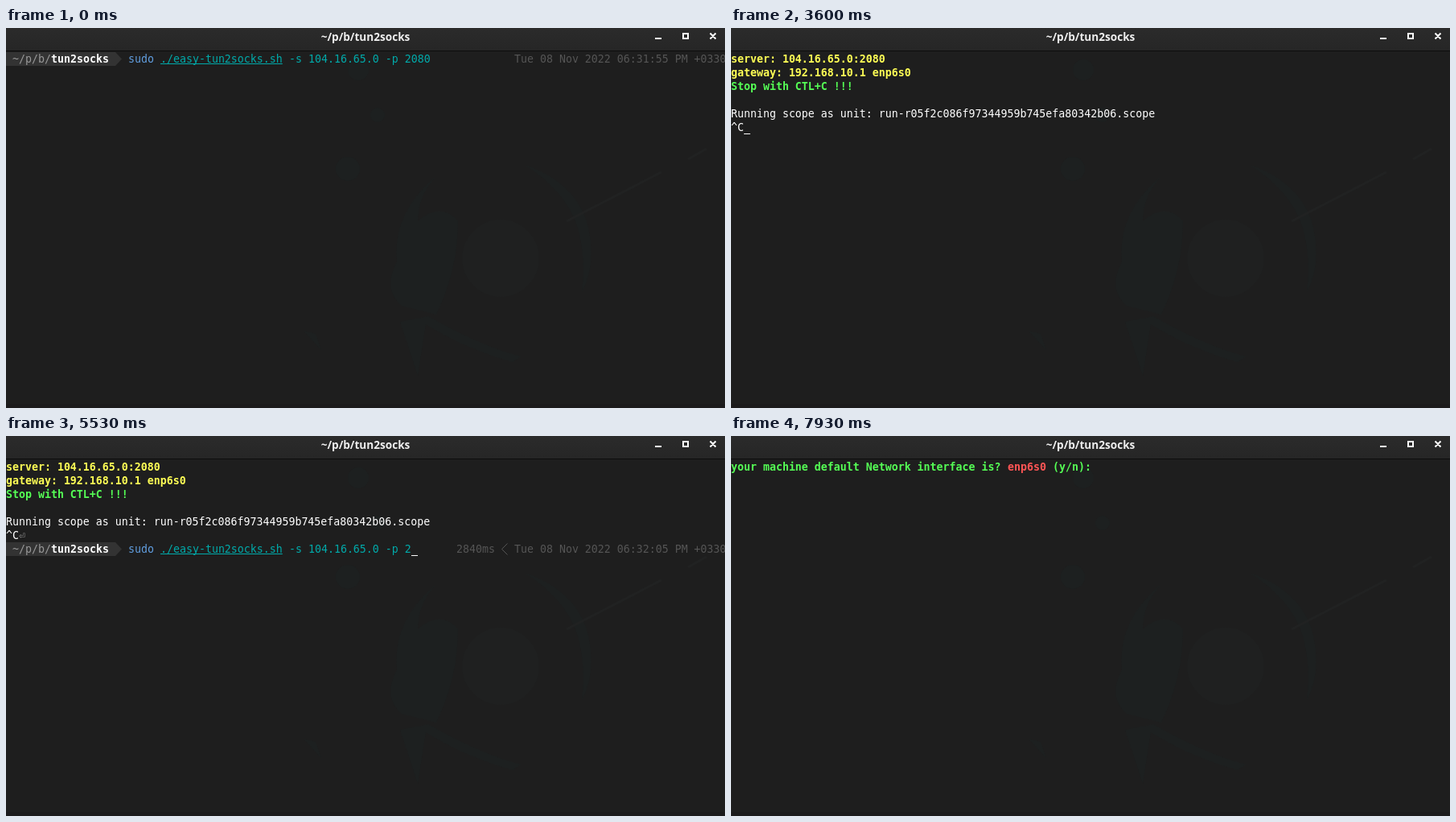
Write an HTML page that moves like this. It is 894 px wide and 472 px high and loops after 8 s.

```html
<!DOCTYPE html>
<html lang="en">
<head>
<meta charset="utf-8">
<title>Terminal</title>
<style>
html, body { margin: 0; width: 100%; height: 100%; overflow: hidden; background: #1e1e1e; }
#stage { position: relative; width: 894px; height: 472px; overflow: hidden; background: #1e1e1e; }
#stage svg, #screen, #bar { position: absolute; left: 0; top: 0; }
#bar { width: 894px; height: 28px; background: linear-gradient(#2b2b2b, #262626); border-bottom: 1px solid #0d0d0d; }
#title { position: absolute; left: 0; width: 894px; top: 1px; text-align: center;
  font: bold 13.6px/20px "Noto Sans", sans-serif; color: #eee; }
#screen { top: 30px; width: 894px; height: 442px; overflow: hidden;
  font: 13.288px/17px "DejaVu Sans Mono", monospace; color: #fff; }
#screen > * { position: absolute; white-space: pre; height: 17px; }
.bold { font-weight: bold; }
.yellow { color: #ff5; }
.green { color: #5f5; }
.red { color: #f55; }
.blue { color: #619ee0; }
.cyan { color: #0aa; }
.path { color: #999; }
.dim { color: #555; }
.line { color: #0aa; text-decoration: underline 1px; text-underline-offset: 1px; text-decoration-skip-ink: none; }
.tab { width: 136px; background: #333; }
.tip { width: 8px; background: #333; clip-path: polygon(0 0, 100% 50%, 0 100%); }
#screen .cursor { width: 8px; height: 1px; margin-top: 16px; background: #fff; }
</style>
</head>
<body>
<div id="stage">
  <svg width="894" height="472" fill="none">
    <g fill="#1d2020">
      <circle cx="425" cy="175" r="15"/>
      <circle cx="462" cy="108" r="9"/>
      <circle cx="438" cy="52" r="13"/>
      <path d="M534 185Q480 230 486 290Q468 325 492 345L535 356Q562 300 562 240Q540 215 512 240Q512 210 534 185Z"/>
      <path d="M645 170Q705 190 722 240Q736 290 716 328Q722 280 708 240Q692 200 645 170Z"/>
      <path d="M490 365L525 358Q590 395 640 408L630 415Q570 398 522 368L512 432Z"/>
      <path d="M370 376L385 380L392 400Z"/>
    </g>
    <path d="M697 240L815 179M848 163L871 150" stroke="#212222" stroke-width="3"/>
    <circle cx="615" cy="286" r="48" fill="#1f2020"/>
    <path d="M0 467H894V472H0Z" fill="#1c1b1c"/>
  </svg>
  <div id="bar">
    <div id="title">~/p/b/tun2socks</div>
    <svg width="894" height="28" fill="none" stroke="#fff" stroke-width="2">
      <path d="M807 13H815M842 7H848V13H842ZM875.5 6.500L882.500 13.500M882.500 6.500L875.500 13.500"/>
    </svg>
  </div>
  <div id="screen"></div>
</div>
<script>
const LOOP = 8000, CELL = 8, ROW = 17;
const screen = document.getElementById('screen');

const put = (col, row, text, cls = '') =>
  `<span class="${cls}" style="left:${col * CELL}px;top:${row * ROW}px">${text}</span>`;
const cursor = (col, row) => put(col, row, '', 'cursor');

const WORDS = [[19, 'sudo', 'blue'], [24, './easy-tun2socks.sh', 'line'],
  [44, '-s 104.16.65.0 -p 2080', 'cyan']];
const END = 66;

// Shows the command only up to column `end`.
const command = (row, end) => WORDS.filter(([col]) => col < end)
  .map(([col, text, cls]) => put(col, row, text.slice(0, end - col), cls)).join('');

const prompt = (row, clock) =>
  put(0, row, '', 'tab') + put(17, row, '', 'tip') +
  put(1, row, '~/p/b/', 'path') + put(7, row, 'tun2socks', 'bold') +
  put(79, row, `Tue 08 Nov 2022 ${clock} PM +0330`, 'dim');

const chevron = put(77, 6, '<svg width="8" height="17" fill="none" stroke="#555"><path d="M7.500 1.500L0.500 8.500L7.500 15.500"/></svg>');

const first = prompt(0, '06:31:55') + command(0, END);
const header = put(0, 0, 'server: 104.16.65.0:2080', 'bold yellow') +
  put(0, 1, 'gateway: 192.168.10.1 enp6s0', 'bold yellow') +
  put(0, 2, 'Stop with CTL+C !!!', 'bold green');
const running = header + put(0, 4, 'Running scope as unit: run-r05f2c086f97344959b745efa80342b06.scope');
const stopped = running + put(0, 5, '^C');
const second = stopped + put(2, 5, '⏎', 'path') + prompt(6, '06:32:05') +
  put(70, 6, '2840ms', 'dim') + chevron;
const question = put(0, 0, 'your machine default Network interface is?', 'bold green') +
  put(43, 0, 'enp6s0', 'bold red') + put(50, 0, '(y/n):', 'bold green');

const edit = end => second + command(6, end) + cursor(end, 6);

const erasing = [[5070, 65], [5530, 63], [5600, 61], [5670, 59], [5730, 56], [5800, 54],
  [5870, 52], [6000, 47], [6270, 46], [6470, 45], [6600, 44], [6930, 43]];

const steps = [
  [0, first],
  [600, first + cursor(END, 0)],
  [870, cursor(0, 0)],
  [930, header + cursor(0, 4)],
  [1000, running + cursor(0, 5)],
  [1470, running],
  [2130, running + cursor(0, 5)],
  [3070, running],
  [3600, stopped + cursor(2, 5)],
  [3730, edit(19)],
  [4070, edit(END)],
  [4670, second + command(6, END)],
  [5000, edit(END)],
  ...erasing.map(([time, end]) => [time, edit(end)]),
  [7400, cursor(0, 0)],
  [7470, question + cursor(57, 0)],
  [7930, question]
];

const start = performance.now();
let shown = null;
function draw() {
  const time = (performance.now() - start) % LOOP;
  const step = steps.findLast(([from]) => from <= time);
  if (step !== shown) {
    screen.innerHTML = step[1];
    shown = step;
  }
  requestAnimationFrame(draw);
}
draw();
</script>
</body>
</html>
```
